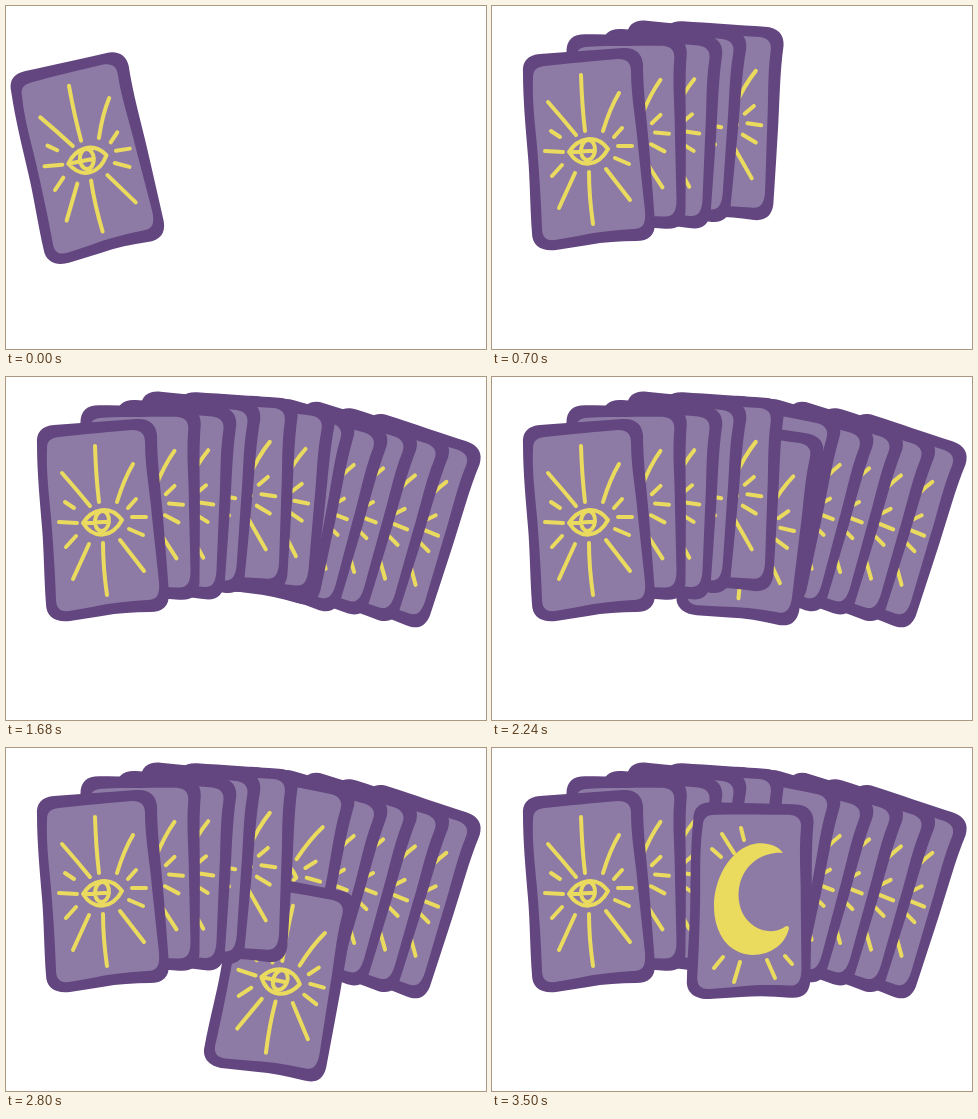
An HTML page with a canvas that plays this animation: 480x343 px, repeating every 4200 ms.

```html
<!DOCTYPE html>
<html lang="en">
<head>
<meta charset="utf-8">
<title>Card draw</title>
<style>
  html, body { margin: 0; width: 100%; height: 100%; overflow: hidden; background: #fff; }
  canvas { display: block; }
</style>
</head>
<body>
<canvas id="stage" width="480" height="343"></canvas>
<script>
const ctx = document.getElementById('stage').getContext('2d');
const STEP = 140, LOOP = 4200;
const BORDER = '#63467f', FACE = '#8d7ba6', YELLOW = '#eadb5e';

// Card art is drawn around the centre of its eye.
const outer = new Path2D(`M-65-78 C-66-90-60-96-48-97 C-22-99 8-101 34-103
  C47-104 54-98 55-87 C55-60 59-30 61-5 C63 20 65 45 67 72 C67 84 61 90 48 90
  C32 90 16 91 0 94 L-32 99 C-47 101-56 94-56 82 C-58 55-58 28-60 5 C-62-20-65-50-65-78Z`);
const inner = new Path2D(`M-55-73 C-55-81-52-84-43-85 C-18-88 8-90 30-92
  C39-92 43-88 43-80 C43-55 48-30 50-5 L57 60 C58 73 55 78 45 78
  C26 79 8 81-10 85 L-33 89 C-42 90-46 86-46 77 C-47 48-49 20-51-5 C-53-28-56-50-55-73Z`);
const rays = new Path2D(`M-7-76 Q-6-45-3-20 M31-58 Q22-43 15-20 M34-23 L26-14
  M30-5 L44-5 M27 7 L41 13 M18 18 L42 49 M1 21 Q1 45 5 73 M-13 22 L-29 57
  M-26 14 L-36 25 M-25 1 L-43 0 M-28-14 L-37-20 M-12-16 Q-25-32-40-49`);
const eye = new Path2D('M-19 1 C-10-13 8-18 20-2 C10 16-8 18-19 1Z');
eye.ellipse(0, -1, 7, 10, 0.1, 0, Math.PI * 2);

// Moon art uses stage coordinates.
const moon = new Path2D(`M291 105 C285 96 270 93 258 97 C236 105 222 132 222 158
  C222 186 237 206 260 207 C280 207 294 195 297 180 C296 177 294 178 291 180
  C276 188 259 180 251 166 C242 147 247 124 264 112 C273 106 284 104 291 105Z`);
const sparks = new Path2D(`M220 101 L229 109 M230 86 L242 105 M249 80 L252 92
  M231 209 L222 220 M248 214 L242 234 M275 212 L283 230 M293 208 L300 216`);

// Poses: x, y, degrees.
const entry = [81, 154, -8.4];
const fan = [
  [96, 145, 0], [132.7, 129, 4.8], [163, 126, 8.5], [185, 118.5, 10],
  [225, 118, 8], [258, 123, 11], [270.5, 126, 16.5], [298, 131, 21],
  [327, 134, 21.5], [358.5, 140.5, 22], [389.5, 146.5, 22.5]
];
const PICKED = 5, PULL = 16, TO_FRONT = 21, FLIP = 24, SPARKLE = 25;
const pull = [
  [258, 149, 13], [258, 177, 15], [258.5, 196.5, 17], [264, 219, 17],
  [274, 233, 15], [284, 230, 12], [292, 202, 8.2], [275, 186, 6.8], [258.5, 155.5, 5.5]
];

function drawCard([x, y, angle], blank) {
  ctx.save();
  ctx.translate(x, y);
  ctx.rotate(angle * Math.PI / 180);
  ctx.fillStyle = BORDER;
  ctx.fill(outer);
  ctx.fillStyle = FACE;
  ctx.fill(inner);
  if (!blank) {
    ctx.stroke(rays);
    ctx.stroke(eye);
  }
  ctx.restore();
}

function drawPicked(tick) {
  const pose = tick < PULL ? fan[PICKED] : pull[Math.min(tick - PULL, pull.length - 1)];
  drawCard(pose, tick >= FLIP);
  if (tick >= FLIP) {
    ctx.fillStyle = YELLOW;
    ctx.fill(moon);
  }
  if (tick >= SPARKLE) ctx.stroke(sparks);
}

function draw(tick) {
  ctx.fillStyle = '#fff';
  ctx.fillRect(0, 0, 480, 343);
  ctx.strokeStyle = YELLOW;
  ctx.lineWidth = 4;
  ctx.lineCap = ctx.lineJoin = 'round';
  if (tick === 0) return drawCard(entry);
  for (let i = Math.min(tick, fan.length) - 1; i >= 0; i--) {
    if (i !== PICKED) drawCard(fan[i]);
    else if (tick < TO_FRONT) drawPicked(tick);
  }
  if (tick >= TO_FRONT) drawPicked(tick);
}

const start = performance.now();
function frame() {
  draw(Math.floor((performance.now() - start) % LOOP / STEP));
  requestAnimationFrame(frame);
}
frame();
</script>
</body>
</html>
```
